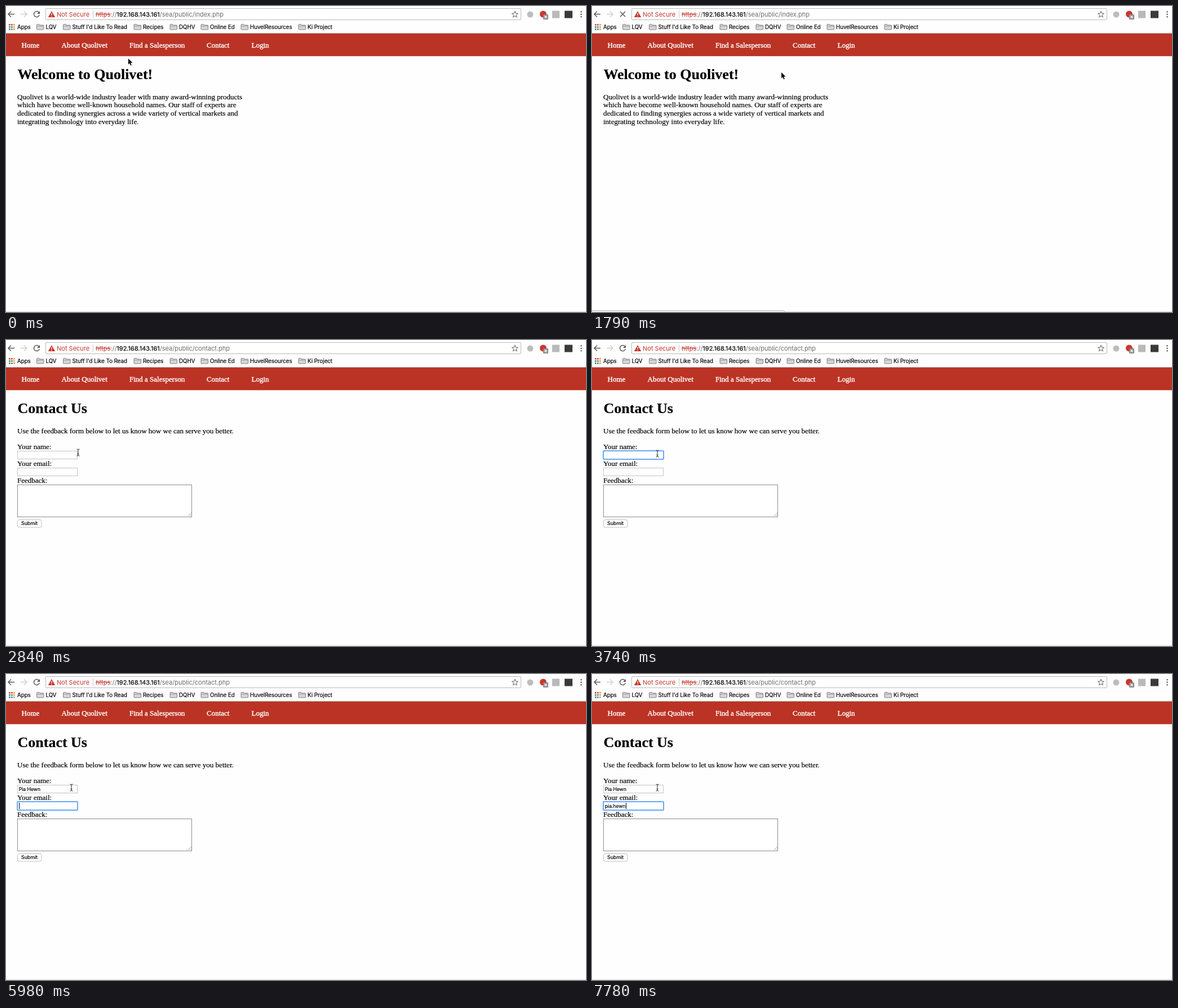
Write an HTML page that moves like this. It is 1029 px wide and 544 px high and loops after 8 s.

```html
<!DOCTYPE html>
<html lang="en">
<head>
<meta charset="utf-8">
<title>Contact form</title>
<style>
  html, body { margin: 0; width: 100%; height: 100%; overflow: hidden; background: #fefefe; }
  svg { display: block; width: 100vw; height: 100vh; }
  text { white-space: pre; }
  .ui { font-family: Inter, sans-serif; }
  .omni { font-size: 11px; }
  .marks { font-size: 9.72px; }
  .field { font-size: 8.6px; }
  .page { font: 13px "Liberation Serif", serif; }
  .page text, .marks text { stroke: currentColor; stroke-width: .2; }
  .nav { color: #fff; fill: #fff; }
  .nav text { stroke-width: .4; }
  .big { font-size: 26px; font-weight: bold; }
  .icon { fill: none; stroke: #5a5a5a; stroke-width: 1.5; }
  .box { fill: #fff; stroke: #c4c4c4; }
  .ring { fill: none; stroke: #68a9f4; stroke-width: 2; }
</style>
</head>
<body>
<svg viewBox="0 0 1029 544">
  <defs>
    <g id="folder">
      <path d="M.5 9V1.5q0-1 1-1H5L6 2h6q1 0 1 1v6q0 1-1 1H1.500q-1 0-1-1Z" fill="#d6d6d6" stroke="#777" stroke-width=".9"/>
      <path d="M1 3.800H12.500" stroke="#8a8a8a" stroke-width=".8"/>
    </g>
  </defs>
  <rect width="1029" height="544" fill="#fefefe"/>

  <g class="icon">
    <path d="M15 14.500H4M9 9.500l-5 5 5 5"/>
    <path d="M26 14.500H37M32 9.500l5 5-5 5" stroke="#d0d0d0"/>
    <g id="reload">
      <path d="M58.700 11.800A5 5 0 1 0 59.300 16"/>
      <path d="M60 9v5h-5Z" fill="#5a5a5a" stroke="none"/>
    </g>
    <path id="stop" d="M50 10l9 9M59 10l-9 9"/>
    <rect x="70.500" y="4.500" width="843" height="20" rx="1.500" fill="#fff" stroke="#b9b9b9" stroke-width="1"/>
    <path d="M903 9.300l1.500 3.700 4 .3-3.100 2.600 1 3.900-3.400-2.100-3.400 2.100 1-3.900-3.100-2.600 4-.3Z" stroke-width="1"/>
  </g>
  <path d="M81 9l6.200 11H74.800Z" fill="#c5372c"/>
  <path d="M81 12.500v3.800M81 17.300v1.400" stroke="#fff" stroke-width="1.300"/>
  <path d="M154.500 8v13" stroke="#c8c8c8"/>
  <g class="ui omni">
    <text x="90" y="18.500" fill="#c5372c">Not Secure</text>
    <text x="159" y="18.500" fill="#6c6c6c"><tspan fill="#c5372c" text-decoration="line-through">https</tspan>://<tspan fill="#000" stroke="#000" stroke-width=".2">192.168.143.161</tspan><tspan id="path"></tspan></text>
  </g>
  <circle cx="930" cy="15" r="5.500" fill="#bdbdbd"/>
  <circle cx="953" cy="14.500" r="6" fill="#cf352b"/>
  <rect x="953" y="15" width="9" height="9" rx="1" fill="#8c8c8c"/>
  <path d="M955.500 17.500l4 4m0-4l-4 4" stroke="#fff" stroke-width="1.200"/>
  <rect x="969" y="8.500" width="13" height="13" fill="#b9b9b9"/>
  <rect x="991" y="8.500" width="14" height="13" fill="#3a3a3a"/>
  <path d="M1020.500 10.200v.01M1020.500 14.700v.01M1020.500 19.200v.01" stroke="#5a5a5a" stroke-width="2.600" stroke-linecap="round"/>
  <g id="apps"></g>
  <g id="marks" class="ui marks"><text x="20" y="40.800">Apps</text></g>

  <path d="M0 48.500H1029" stroke="#b9b5b4"/>
  <rect y="49" width="1029" height="40.200" fill="#bb3324"/>
  <g id="nav" class="page nav"></g>

  <g id="home" class="page"><text class="big" x="20.500" y="130">Welcome to Quolivet!</text></g>
  <g id="contact" class="page">
    <text class="big" x="20.500" y="130">Contact Us</text>
    <text x="20" y="165.800">Use the feedback form below to let us know how we can serve you better.</text>
    <text x="20" y="193.500">Your name:</text>
    <text x="20" y="223.700">Your email:</text>
    <text x="20" y="253.700">Feedback:</text>
    <rect class="box" x="20.500" y="197.500" width="106" height="14"/>
    <rect class="box" x="20.500" y="227.500" width="106" height="14"/>
    <rect class="box" x="20.500" y="257.500" width="309" height="57" style="stroke:#8c8c8c"/>
    <path d="M323 313l6-6M326.500 313l2.500-2.500" stroke="#888" stroke-width=".8"/>
    <rect class="box" x="20.500" y="319.500" width="42.500" height="13.500" rx="3" style="stroke:#bdbdbd"/>
    <text class="ui" x="27" y="329.400" font-size="8.900">Submit</text>
    <rect id="ring" class="ring" x="20" y="197" width="107" height="15" rx="1"/>
    <text id="name" class="ui field" x="22.800" y="208"></text>
    <text id="email" class="ui field" x="22.800" y="238"></text>
    <rect id="caret" width="1" height="11"/>
  </g>

  <path d="M0 543.500H1029" stroke="#dcdcdc"/>
  <path id="status" d="M-1 545V541.500H339q2.500 0 2.500 2.500v1" fill="#f1f1f1" stroke="#b5b5b5"/>

  <path id="arrow" d="M0 0V10.500L2.400 8.300 4.100 12.200 5.800 11.500 4.200 7.600H7.500Z" stroke="#fff" stroke-width="1.200" paint-order="stroke"/>
  <path id="hand" d="M2.800 7.300V1.500a1.200 1.200 0 0 1 2.400 0V5l4 .9q1.600.4 1.300 2L9.700 11v2.500H4.500V12L.8 8.400q-.6-1.400.8-1.500Z" fill="#fff" stroke="#000"/>
  <path id="beam" d="M-2.500-6q2.500 0 2.500 1.500V4.500Q0 6-2.500 6M2.500-6Q0-6 0-4.500M2.500 6Q0 6 0 4.500M-1.500 2.500h3" fill="none" stroke="#222"/>
</svg>
<script>
const LOOP = 8000;
const $ = id => document.getElementById(id);

function add(parent, tag, attrs, label = '') {
  const el = document.createElementNS('http://www.w3.org/2000/svg', tag);
  for (const key in attrs) el.setAttribute(key, attrs[key]);
  el.textContent = label;
  $(parent).append(el);
}

['#dd4b3e', '#dd4b3e', '#e8a33d', '#3f9c5a', '#4a86e8', '#e8a33d', '#3f9c5a', '#4a86e8', '#e8a33d']
  .forEach((fill, i) => add('apps', 'rect', { x: 5 + i % 3 * 4, y: 32 + (i / 3 | 0) * 4, width: 2.8, height: 2.8, fill }));

[[54, 'LQV'], [101, "Stuff I'd Like To Read"], [226.5, 'Recipes'], [290.5, 'DQHV'],
 [345.5, 'Online Ed'], [416.5, 'HuvelResources'], [518.5, 'Ki Project']].forEach(([x, label]) => {
  add('marks', 'use', { href: '#folder', x, y: 32 });
  add('marks', 'text', { x: x + 16.5, y: 40.8 }, label);
});

[[27.5, 'Home'], [98.5, 'About Quolivet'], [219, 'Find a Salesperson'], [356, 'Contact'], [435.5, 'Login']]
  .forEach(([x, label]) => add('nav', 'text', { x, y: 74 }, label));

['Quolivet is a world-wide industry leader with many award-winning products',
 'which have become well-known household names. Our staff of experts are',
 'dedicated to finding synergies across a wide variety of vertical markets and',
 'integrating technology into everyday life.']
  .forEach((line, i) => add('home', 'text', { x: 20, y: 165.8 + i * 14.625 }, line));

// Each track holds [start, value...] steps.
const pointer = [
  [0, 'arrow', 217, 93.5], [140, 'arrow', 242, 91], [290, 'arrow', 305, 84], [440, 'hand', 350, 76],
  [590, 'hand', 359, 73.5], [1190, 'hand', 359, 75], [1340, 'arrow', 354, 98], [1490, 'arrow', 343, 114],
  [1640, 'arrow', 335, 120], [1790, 'arrow', 336, 118], [2240, 'arrow', 339, 113.5],
  [2390, 'arrow', 318, 122], [2540, 'arrow', 250, 148], [2690, 'arrow', 178, 178],
  [2840, 'beam', 128, 200], [2990, 'beam', 116, 202]
];
const names = [[0, ''], [4040, 'p'], [4490, ''], [4640, 'P'], [4790, 'Pi'], [4940, 'Pia'],
  [5390, 'Pia '], [5540, 'Pia H'], [5690, 'Pia He'], [5840, 'Pia Hewn']];
const emails = [[0, ''], [6580, 'pi'], [6730, 'pia'], [7030, 'pia.'], [7180, 'pia.h'], [7330, 'pia.hew'], [7780, 'pia.hewn']];

const at = (track, t) => track.findLast(step => step[0] <= t).slice(1);
const within = (t, from, to) => t >= from && t < to;
const show = (id, on) => $(id).style.display = on ? '' : 'none';

function render(t) {
  const loaded = t >= 2240, second = t >= 5980;
  show('home', !loaded);
  show('contact', loaded);
  $('path').textContent = `/sea/public/${loaded ? 'contact' : 'index'}.php`;

  const loading = within(t, 890, 2240);
  show('stop', loading);
  show('reload', !loading);
  show('status', within(t, 440, 2390));

  $('name').textContent = at(names, t)[0];
  $('email').textContent = at(emails, t)[0];
  show('ring', t >= 3140);
  $('ring').setAttribute('y', second ? 227 : 197);
  show('caret', t >= 3140 && !within(t, 3740, 4040));
  if (loaded) {
    const width = $(second ? 'email' : 'name').getComputedTextLength();
    $('caret').setAttribute('x', Math.round(23 + width));
    $('caret').setAttribute('y', second ? 229 : 199);
  }

  const [kind, x, y] = at(pointer, t);
  for (const id of ['arrow', 'hand', 'beam']) show(id, id === kind);
  $(kind).setAttribute('transform', `translate(${x} ${y})`);
}

function tick() {
  render(performance.now() % LOOP);
  requestAnimationFrame(tick);
}
tick();
</script>
</body>
</html>
```
